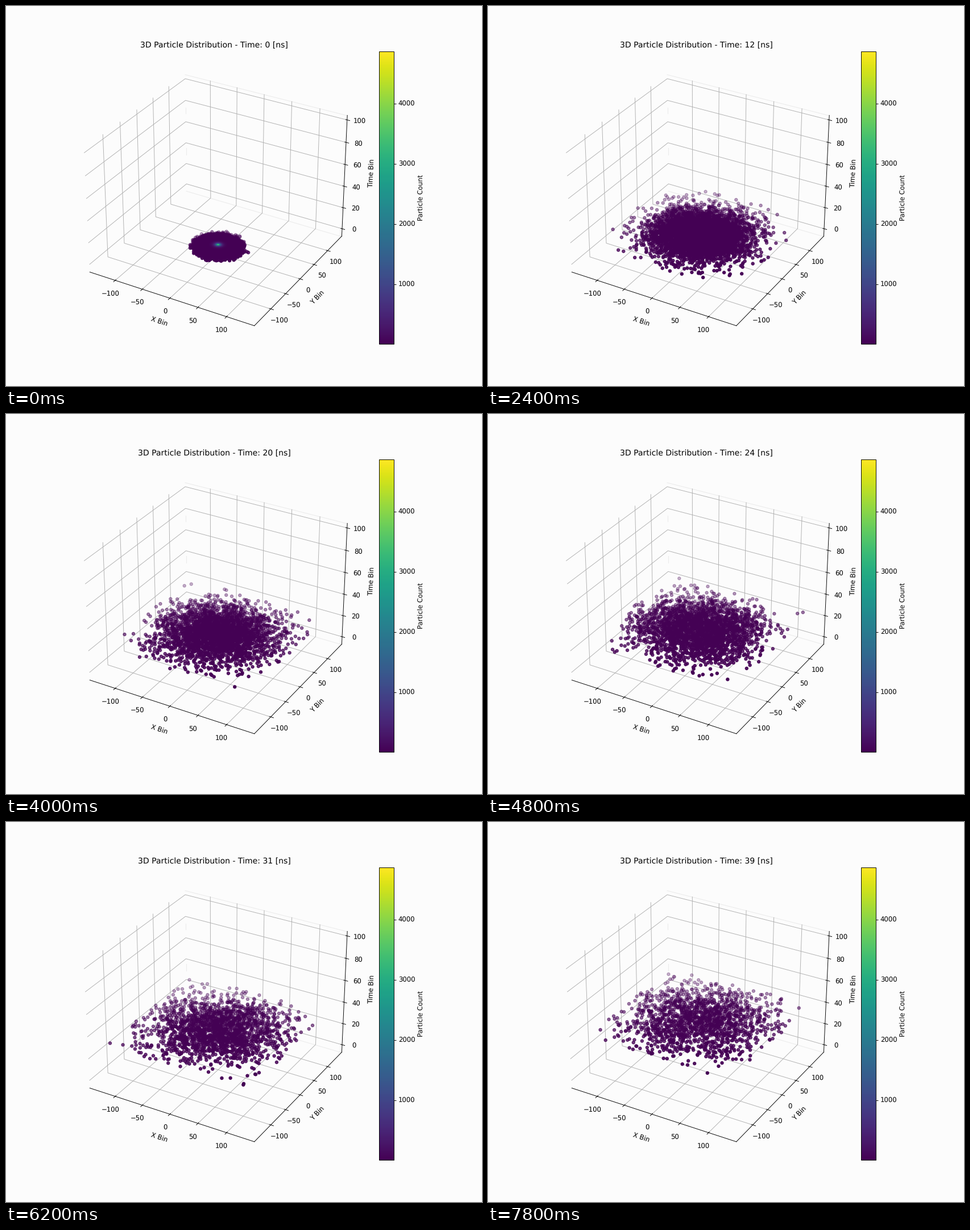
Write a matplotlib script that moves like this. It is 837x669 px and loops after 8 s.

```python
import numpy as np
import matplotlib.pyplot as plt
from matplotlib.animation import FuncAnimation
from matplotlib.cm import ScalarMappable
from matplotlib.colors import Normalize
from matplotlib.lines import Line2D

W, H, DPI = 837, 669, 83.7
BG = "#fcfcfc"
FRAMES, STEP = 40, 200
PEAK = 4862
X_MAX, Y_MAX, T_MAX = 129, 134, 97

plt.rcParams["text.hinting"] = "none"
fig = plt.figure(figsize=((W + 0.01) / DPI, (H + 0.01) / DPI), dpi=DPI, facecolor=BG)
ax = fig.add_subplot(111, projection="3d")
ax.patch.set_visible(False)

cmap = plt.get_cmap("viridis")
norm = Normalize(1, PEAK)
fig.colorbar(ScalarMappable(norm, cmap), ax=ax, label="Particle Count")


def padded(low, high):
    """Limits with a 5% data margin plus the 1/48 view margin."""
    pad = (high - low) * (0.05 + 1.1 / 48)
    return low - pad, high + pad


ax.set(xlim=padded(-X_MAX, X_MAX), ylim=padded(-Y_MAX, Y_MAX), zlim=padded(0, T_MAX),
       xlabel="X Bin", ylabel="Y Bin", zlabel="Time Bin")
ax.set_xticks(range(-100, 101, 50))
ax.set_yticks(range(-100, 101, 50))
ax.set_zticks(range(0, 101, 20))
for axis in (ax.xaxis, ax.yaxis, ax.zaxis):
    axis.set_pane_color((1, 1, 1, 0))


def faint_line(x0, y0, x1, y1):
    """Pale pane edge, in pixels from the top left."""
    fig.add_artist(Line2D([x0 / W, x1 / W], [1 - y0 / H, 1 - y1 / H],
                          color="#ebebeb", lw=0.9, zorder=-1))


faint_line(315, 121, 600, 193)
faint_line(317, 326, 590, 406)
faint_line(316, 179, 316, 189)
faint_line(317, 250, 317, 262)

gx, gy = np.meshgrid(np.arange(-X_MAX, X_MAX + 1), np.arange(-Y_MAX, Y_MAX + 1))
gx, gy = gx.ravel(), gy.ravel()
radius = np.hypot(gx, gy)


def particles(t):
    """Occupied bins and their counts for a cloud that spreads and thins out."""
    if t == 0:
        spread, density = 10, 900
    else:
        spread, density = 35 * (t / 8) ** 0.32, (8 / t) ** 1.6
    mean = density * np.exp(-radius**2 / (2 * spread**2))
    rng = np.random.default_rng(100 + t)
    hit = rng.random(radius.size) < 1 - np.exp(-mean)
    count = PEAK * 0.35**t * np.exp(-radius[hit] / (3 + t))
    return gx[hit], gy[hit], np.maximum(count, 1)


cloud = None


def update(t):
    global cloud
    if cloud is not None:
        cloud.remove()
    x, y, count = particles(t)
    cloud = ax.scatter(x, y, np.full(x.size, t), c=cmap(norm(count)))
    title = ax.set_title(f"3D Particle Distribution - Time: {t} [ns]")
    return cloud, title


anim = FuncAnimation(fig, update, frames=FRAMES, interval=STEP,
                     init_func=lambda: update(0), repeat=True, repeat_delay=0)
plt.show()
```
